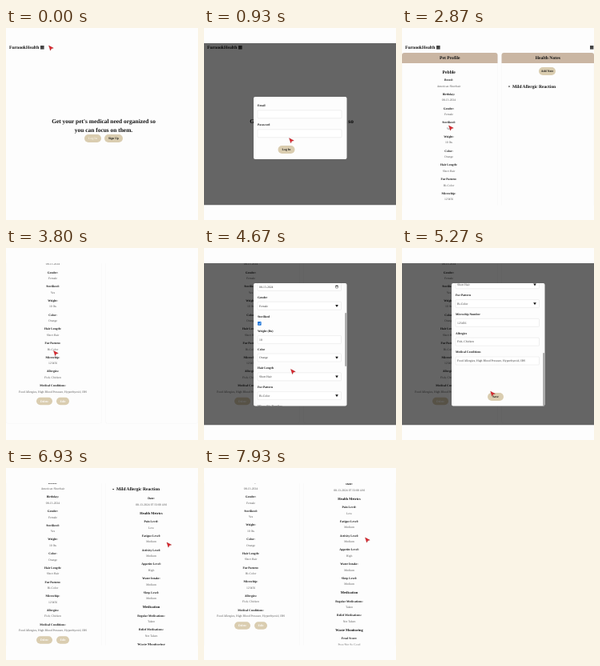
Write an HTML page that moves like this. It is 240 px wide and 240 px high and loops after 8000 ms.

```html
<!DOCTYPE html>
<html lang="en">
<head>
<meta charset="utf-8">
<title>Pet care</title>
<style>
html, body { margin: 0; width: 100%; height: 100%; overflow: hidden; background: #fdfdfd; }
svg { display: block; width: 100%; height: 100%; }
text { font-family: "Liberation Serif", "Times New Roman", serif; text-rendering: geometricPrecision; }
</style>
</head>
<body>
<svg id="stage" viewBox="0 0 240 240"></svg>
<script>
const NS = "http://www.w3.org/2000/svg";
const stage = document.getElementById("stage");
const BRAND = "FurnookHealth", PET = "Pebble", DAY = "08-13-2024";
const TAN = "#cab6a3", SAND = "#dacdb0", INK = "#111", GREY = "#555";
const STEP = 200 / 3, LOOP = 8000;

function el(parent, tag, attrs = {}) {
  const node = document.createElementNS(NS, tag);
  for (const k in attrs) node.setAttribute(k, attrs[k]);
  parent.appendChild(node);
  return node;
}
const group = (parent, attrs) => el(parent, "g", attrs);
const rect = (p, x, y, width, height, fill, rx = 0, more = {}) =>
  el(p, "rect", { x, y, width, height, fill, rx, ...more });

// y is the middle of the capitals
function text(p, str, x, y, size, { bold = false, fill = INK, anchor = "middle" } = {}) {
  const node = el(p, "text", {
    x, y: y + size * 0.33, "font-size": size, fill,
    "font-weight": bold ? 700 : 400, "text-anchor": anchor
  });
  node.textContent = str;
}
function pill(p, str, x, y, w, h, fill) {
  rect(p, x - w / 2, y - h / 2, w, h, SAND, h / 2);
  text(p, str, x, y, 3.8, { bold: true, fill });
}
function header(p, menu) {
  text(p, BRAND, 4, 24.5, 5.65, { bold: true, anchor: "start" });
  rect(p, 43, 22, 4.6, 4.6, "#444");
  if (menu) rect(p, 235, 22, 4.4, 4.6, "#444");
}
const panel = (p, x, y, w, h) =>
  rect(p, x, y, w, h, "#fdfdfd", 3, { stroke: "#f6f6f6", "stroke-width": 0.6 });
function bar(p, title, x, y, w) {
  el(p, "path", { d: `M${x} ${y + 13}v-10q0-3 3-3h${w - 6}q3 0 3 3v10z`, fill: TAN });
  text(p, title, x + w / 2, y + 6.5, 5.65, { bold: true });
}
// "Label|value" pairs; a lone label is a section heading
function rows(p, list, x, y) {
  for (const row of list) {
    const [label, value] = row.split("|");
    if (value) {
      text(p, label + ":", x, y, 3.75, { bold: true });
      text(p, value, x, y + 7.5, 3.75, { fill: GREY });
      y += 17.7;
    } else {
      text(p, label, x, y + 0.5, 4.45, { bold: true });
      y += 11.2;
    }
  }
}

function buildHome(p) {
  header(p, false);
  text(p, "Get your pet's medical need organized so", 122, 117, 7.43, { bold: true });
  text(p, "you can focus on them.", 122, 128, 7.43, { bold: true });
  pill(p, "Log In", 108.5, 138, 21, 10, "#f6f1e4");
  pill(p, "Sign Up", 134.5, 138, 23, 10, INK);
}

function buildDashboard(p) {
  header(p, true);
  [["Pets", 0, 31], ["Upcoming Care", 124.5, 31], ["Quick Links", 0, 105.5], ["Member Forum", 124.5, 105.5]]
    .forEach(([title, x, y], i) => {
      panel(p, x, y, 119.5, 64.5);
      bar(p, title, x, y, 119.5);
      if (i) text(p, "Coming Soon", x + 59.7, y + 20.5, 3.8, { fill: "#333" });
    });
  el(p, "path", { d: "M47 51.3l1.3 1.4h1.2v-2.2l.9.8h.7l.7-.8v2.6l-.8.8v1.6h-3.2v-1.9z", fill: INK });
  el(p, "circle", { cx: 69.3, cy: 53.2, r: 2.1, fill: INK });
  el(p, "path", { d: "M69.3 52v2.4M68.1 53.2h2.4", stroke: "#fff", "stroke-width": 0.6 });
  text(p, PET, 49, 60, 3.8);
  text(p, "Add Pet", 69.3, 60, 3.8);
}

function buildPet(p) {
  header(p, true);
  panel(p, 0, 31, 119.5, 258.5);
  panel(p, 124.5, 31, 115.5, 258.5);
  bar(p, "Pet Profile", 0, 31, 119.5);
  bar(p, "Health Notes", 124.5, 31, 115.5);
  text(p, PET, 58.7, 55.2, 5.65, { bold: true });
  rows(p, ["Breed|American Shorthair", "Birthday|" + DAY, "Gender|Female", "Sterilized|Yes",
    "Weight|10 lbs", "Color|Orange", "Hair Length|Short Hair", "Fur Pattern|Bi-Color",
    "Microchip|123456", "Allergies|Fish, Chicken",
    "Medical Conditions|Food Allergies, High Blood Pressure, Hyperthyroid, IBS"], 58.5, 64.9);
  pill(p, "Delete", 48, 261.5, 20, 9.5, "#fff");
  pill(p, "Edit", 71, 261.5, 16, 9.5, "#fff");
  pill(p, "Add Note", 181.5, 54, 21, 10, INK);
  text(p, "Mild Allergic Reaction", 138, 73, 5.6, { bold: true, anchor: "start" });
  const closed = el(p, "path", { d: "M133.5 72l1.6 1.1-1.6 1.1z", fill: INK });
  const open = group(p);
  el(open, "path", { d: "M133 72.5h2.2l-1.1 1.6z", fill: INK });
  rows(open, [`Date|${DAY} 07:33:00 AM`], 181.5, 84.3);
  rows(open, ["Health Metrics", "Pain Level|Low", "Fatigue Level|Medium", "Activity Level|Medium",
    "Appetite Level|High", "Water Intake|Medium", "Sleep Level|Medium",
    "Medication", "Regular Medications|Taken", "Relief Medications|Not Taken",
    "Waste Monitoring", "Fecal Score|Poor/Not So Good"], 181.5, 102.3);
  return { closed, open };
}

function field(p, label, kind, value, x, y, w) {
  text(p, label, x, y, 3.75, { bold: true, anchor: "start" });
  const cy = y + 10.8;
  if (kind === "check") {
    rect(p, x, y + 6.8, 4.6, 4.6, "#1a73d8", 0.7);
    el(p, "path", { d: `M${x + 1} ${y + 9.2}l1 1 1.7-2.1`, fill: "none", stroke: "#fff", "stroke-width": 0.7 });
    return;
  }
  rect(p, x, cy - 5, w, 10, "#fff", 1, { stroke: "#d8d8d8", "stroke-width": 0.4 });
  text(p, value, x + 2, cy, 3.75, { fill: "#333", anchor: "start" });
  const ix = x + w - 5.5;
  if (kind === "select") el(p, "path", { d: `M${ix - 1.8} ${cy - 1.4}h3.6l-1.8 3z`, fill: INK });
  if (kind === "date") {
    rect(p, ix - 1.4, cy - 1.4, 2.8, 2.9, "none", 0.2, { stroke: "#222", "stroke-width": 0.5 });
    rect(p, ix - 1.4, cy - 1.6, 2.8, 0.9, "#222");
  }
}

const dim = p => rect(p, 0, 19, 240, 202.5, "#000", 0, { opacity: 0.6 });

function buildLogin(p) {
  dim(p);
  rect(p, 62, 86, 116.5, 78, "#fdfdfd", 2);
  field(p, "Email", "text", "", 67, 97, 105);
  field(p, "Password", "text", "", 67, 121, 105);
  pill(p, "Log In", 103, 152, 21, 10, INK);
}

function buildEdit(p) {
  dim(p);
  rect(p, 62, 44, 116.5, 153.5, "#fdfdfd", 2);
  const body = group(group(p, { "clip-path": "url(#dialog)" }));
  let y = 75;
  ["Name|text|" + PET, "Breed|select|American Shorthair", "Birthday|date|" + DAY, "Gender|select|Female",
    "Sterilized|check|", "Weight (lbs)|text|10", "Color|select|Orange", "Hair Length|select|Short Hair",
    "Fur Pattern|select|Bi-Color", "Microchip Number|text|123456", "Allergies|text|Fish, Chicken",
    "Medical Conditions|text|Food Allergies, High Blood Pressure, Hyperthyroid, IBS"]
    .forEach(row => {
      const [label, kind, value] = row.split("|");
      field(body, label, kind, value, 67, y, 104.5);
      y += kind === "check" ? 18.5 : kind === "text" && label[0] === "W" ? 22.5 : 23.8;
    });
  pill(body, "Save", 117, 386, 20, 10, INK);
  const thumb = rect(p, 176.3, 44, 1.6, 67, "#9a9a9a", 0.8);
  return { body, thumb };
}

const defs = el(stage, "defs");
const clip = (id, ...box) => rect(el(defs, "clipPath", { id }), ...box);
clip("view", 0, 19, 240, 202.5, "#000");
clip("dialog", 62, 44, 116.5, 153.5, "#000", 2);

const view = group(stage, { "clip-path": "url(#view)" });
const home = group(view), dash = group(view), pet = group(view);
const login = group(view), edit = group(view);
buildHome(home);
buildDashboard(dash);
const note = buildPet(pet);
buildLogin(login);
const form = buildEdit(edit);
const cursor = el(view, "path", {
  d: "M0 0L5.8 3.1 3.2 3.7 2 6.2z", fill: "#e0242c", stroke: "#8c1a1f", "stroke-width": 0.35
});

// Tracks of [ms, value, ...]
const pointer = [[270, 53.5, 22], [700, 107, 137], [870, 107, 137], [1330, 98, 150], [1600, 98, 150],
  [2030, 48, 54], [2270, 48, 54], [3000, 59.5, 128.5], [3800, 59.5, 128.5], [4130, 70, 190],
  [4270, 70, 190], [4660, 108.5, 151.5], [5070, 108.5, 151.5], [5330, 111, 184], [5870, 111, 184],
  [6330, 133, 72], [6530, 133, 72], [6900, 201, 93], [7730, 201, 93], [7920, 201.5, 87]];
const pageScroll = [[3330, 0], [3730, 70], [5600, 70], [5867, 23], [6070, 0], [6600, 0],
  [6933, 46.5], [7470, 58], [7667, 58], [7930, 64.5]];
const formScroll = [[4330, 0], [4667, 85], [5070, 200]];

const smooth = u => u * u * (3 - 2 * u);
function sample(track, t, ease = u => u) {
  const i = track.findIndex(k => k[0] > t);
  if (i < 0) return track[track.length - 1].slice(1);
  if (i === 0) return track[0].slice(1);
  const a = track[i - 1], b = track[i];
  const u = ease((t - a[0]) / (b[0] - a[0]));
  return a.slice(1).map((v, j) => v + (b[j + 1] - v) * u);
}
const show = (node, on) => node.setAttribute("display", on ? "inline" : "none");
const move = (node, x, y) => node.setAttribute("transform", `translate(${x} ${y})`);

function draw(ms) {
  const t = Math.floor((ms % LOOP + 5) / STEP) * STEP;
  show(home, t < 1460);
  show(login, t >= 730 && t < 1460);
  show(dash, t >= 1460 && t < 2130);
  show(pet, t >= 2130);
  show(edit, t >= 4198 && t < 5530);
  show(note.open, t >= 6465);
  show(note.closed, t < 6465);
  move(pet, 0, -sample(pageScroll, t)[0]);
  const s = sample(formScroll, t)[0];
  move(form.body, 0, -s);
  move(form.thumb, 0, s * 0.435);
  move(cursor, ...sample(pointer, t, smooth));
}

const start = performance.now();
function tick() {
  draw(performance.now() - start);
  requestAnimationFrame(tick);
}
tick();
</script>
</body>
</html>
```
